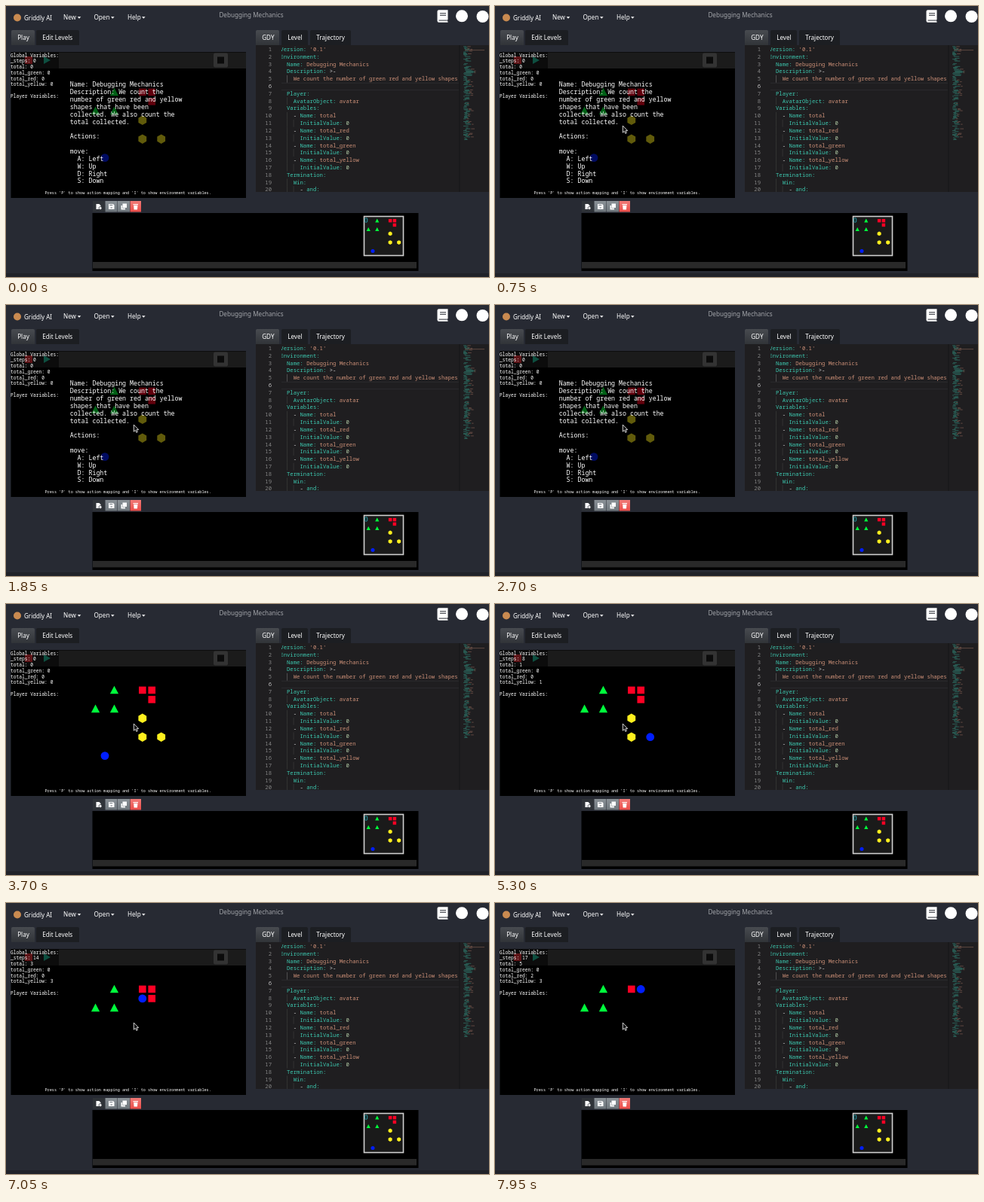
Recreate the animation shown at these times as an HTML page. Size 640 by 360 pixels, loop 8000 ms.

```html
<!DOCTYPE html>
<html lang="en">
<head>
<meta charset="utf-8">
<title>Debugging Mechanics</title>
<style>
html, body { margin: 0; width: 100%; height: 100%; overflow: hidden; background: #272a33; }
svg { display: block; width: 640px; height: 360px; }
text { white-space: pre; fill: #fff; }
.ui text { font: 8.15px "Noto Sans", sans-serif; }
.mono text { font-family: "Noto Sans Mono", monospace; }
.vars text { font-size: 6.27px; font-weight: 500; }
.help text { font-size: 8.28px; }
.code text { font-size: 7.27px; fill: #d4d4d4; }
.code .key { fill: #3dc9b0; }
.code .str { fill: #ce9178; }
.code .num { fill: #b5cea8; }
.code .line { fill: #858585; text-anchor: end; }
</style>
</head>
<body>
<svg viewBox="0 0 640 360">
  <defs>
    <polygon id="green" points="0,-5.8 5.6,4.8 -5.6,4.8" fill="#00ff3c"/>
    <rect id="red" x="-4.8" y="-4.8" width="9.6" height="9.6" fill="#ff0024"/>
    <polygon id="yellow" points="0,-6.2 5.4,-3.1 5.4,3.1 0,6.2 -5.4,3.1 -5.4,-3.1" fill="#fff01e"/>
    <circle id="blue" r="5.4" fill="#001eff"/>
    <linearGradient id="tabFill" x2="0" y2="1"><stop stop-color="#484b50"/><stop offset=".6" stop-color="#3a3d42"/><stop offset="1" stop-color="#313438"/></linearGradient>
    <linearGradient id="greyFill" x2="0" y2="1"><stop stop-color="#8a9196"/><stop offset=".6" stop-color="#7a8288"/><stop offset="1" stop-color="#70787d"/></linearGradient>
    <linearGradient id="redFill" x2="0" y2="1"><stop stop-color="#f17a77"/><stop offset=".6" stop-color="#ee5f5b"/><stop offset="1" stop-color="#ec4d49"/></linearGradient>
    <clipPath id="codeClip"><rect x="365" y="52" width="235" height="195"/></clipPath>
    <clipPath id="lineClip"><rect x="331" y="52" width="34" height="195"/></clipPath>
  </defs>
  <rect width="640" height="360" fill="#272a33"/>
  <rect y="355" width="640" height="5" fill="#202229"/>

  <g class="ui" id="ui">
    <circle cx="15" cy="15.500" r="5" fill="#c98a50"/>
    <text x="24" y="18.600" style="font-weight:500;font-size:8px">Griddly AI</text>
    <text x="325" y="14.800" text-anchor="middle" style="fill:#a3a5aa">Debugging Mechanics</text>
    <path d="M573.500 5.300h12v13h-1v2h1v1.500h-12q-2 0-2-2v-12.500q0-2 2-2z" fill="#fff"/>
    <path d="M575 9.800h8M575 12.300h8M573.500 19.100h10.500" stroke="#272a33"/>
    <circle cx="604" cy="13.300" r="8" fill="#fff"/>
    <circle cx="631.500" cy="14" r="8" fill="#fff"/>
  </g>

  <rect x="6.500" y="61" width="311.500" height="194" fill="#000"/>
  <rect x="70" y="61.500" width="248" height="21.500" fill="#1b1b1b"/>
  <rect x="6.500" y="61.500" width="63.500" height="21.500" fill="#0c0c0c"/>
  <rect x="25" y="67" width="10" height="10" fill="#5e1518"/>
  <path d="M50 67l9 5-9 5z" fill="#0e4f40"/>
  <rect x="275" y="62.500" width="19" height="19" rx="2" fill="#333"/>
  <rect x="280" y="67.500" width="9" height="9" fill="#0b0b0b"/>
  <g id="board"></g>
  <g class="mono vars" id="vars"></g>
  <g class="mono help" id="help"></g>
  <g class="mono"><text x="51.500" y="249.600" style="font-size:5.18px;font-weight:500">Press 'P' to show action mapping and 'I' to show environment variables.</text></g>

  <rect x="331" y="52" width="309" height="195" fill="#1f1e20"/>
  <path d="M365 102.300H600M365 111.700H600" stroke="#2b2b2e"/>
  <g class="mono code" id="lines" clip-path="url(#lineClip)"></g>
  <g class="mono code" id="code" clip-path="url(#codeClip)"></g>
  <path d="M600.800 52V247" stroke="#171719"/>
  <g id="minimap"></g>

  <g id="tools">
    <rect x="115" y="259" width="16" height="14.500" fill="#2f3338"/>
    <rect x="131.500" y="259" width="16" height="14.500" fill="url(#greyFill)"/>
    <rect x="148" y="259" width="16" height="14.500" fill="url(#greyFill)"/>
    <rect x="164.500" y="259" width="14.500" height="14.500" fill="url(#redFill)"/>
    <path d="M119.500 263h4l2 2v5h-6zM136 263h6l1.500 1.500v5.500h-7.500zM154.500 262.500h5.500v5.500h-5.500zM152.500 265h1.500v3.500h4v2h-5.500zM168.500 263h6.500v1.200h-6.500zM169.200 265h5.200l-.4 5.500h-4.400z" fill="#fff"/>
    <path d="M137.300 264.500h4M138.500 268h2.500" stroke="#6c757d"/>
    <circle cx="125" cy="268.500" r="2" fill="#fff" stroke="#2f3338" stroke-width=".7"/>
  </g>
  <rect x="114.500" y="275" width="432" height="77" fill="#000"/>
  <rect x="115" y="340" width="429" height="8.500" fill="#292929"/>
  <rect x="474.500" y="279.500" width="52" height="52" fill="#1a1a1a" stroke="#d0d0d0" stroke-width="1.600"/>
  <rect x="475.700" y="281.800" width="3" height="5.400" rx="1" fill="none" stroke="#23a8b4" stroke-width=".9"/>
  <g id="thumb" transform="translate(486 325.600) scale(.464)"></g>

  <path id="pointer" d="M0 0V9.200L2.100 7.300 3.500 10.400 5 9.700 3.700 6.700H6.500Z" fill="#111" stroke="#fff" stroke-width=".8"/>
</svg>
<script>
const NS = "http://www.w3.org/2000/svg", LOOP = 8000, CELL = 12.45;
const $ = id => document.getElementById(id);

function add(parent, tag, attrs, content) {
  const el = document.createElementNS(NS, tag);
  for (const k in attrs) el.setAttribute(k, attrs[k]);
  if (content !== undefined) el.textContent = content;
  return parent.appendChild(el);
}

// Menus and tabs
for (const [label, x, caret] of [["New", 76, 94.7], ["Open", 116.5, 139], ["Help", 161, 180]]) {
  add($("ui"), "text", { x, y: 18.4 }, label);
  add($("ui"), "path", { d: `M${caret} 14.200h4.600l-2.300 2.500z`, fill: "#fff" });
}
for (const [label, x, w, on] of [["Play", 7, 31, 1], ["Edit Levels", 40, 57, 0], ["GDY", 331, 31, 1],
                                 ["Level", 365, 35, 0], ["Trajectory", 403, 54, 0]]) {
  add($("ui"), "path", { d: `M${x} 52v-18q0-2 2-2h${w - 4}q2 0 2 2v18z`, fill: on ? "url(#tabFill)" : "#1c1e22" });
  add($("ui"), "text", { x: x + 8.2, y: 45 }, label);
}

// Game pieces, counted in cells from the start square
const pieces = [["green", 1, 7], ["green", -1, 5], ["green", 1, 5], ["red", 4, 7], ["red", 5, 7], ["red", 5, 6],
                ["yellow", 4, 4], ["yellow", 4, 2], ["yellow", 6, 2]];
const place = (i, j) => `translate(${i * CELL} ${-j * CELL})`;
const piece = (parent, kind, i, j) => add(parent, "use", { href: "#" + kind, transform: place(i, j) });

$("board").setAttribute("transform", "translate(131 201.600)");
const items = pieces.map(p => piece($("board"), ...p));
const avatar = piece($("board"), "blue", 0, 0);
pieces.forEach(p => piece($("thumb"), ...p));
piece($("thumb"), "blue", 0, 0);

// Keys pressed: R, L, U, or "." for a turn without a move
const keys = "RRRRRRUULLUUUUR.U";
const times = [3850, 4000, 4150, 4300, 4450, 4600, 5000, 5300, 5650, 5900, 6250, 6450, 6700, 6900, 7300, 7550, 7800];
const states = [{ i: 0, j: 0, got: [] }];
for (const k of keys) {
  const s = states[states.length - 1];
  const i = s.i + (k === "R") - (k === "L"), j = s.j + (k === "U");
  const hit = pieces.findIndex(p => p[1] === i && p[2] === j);
  states.push({ i, j, got: hit < 0 || s.got.includes(hit) ? s.got : [...s.got, hit] });
}

// Counters and help text
const rows = Array.from({ length: 8 }, (_, n) => add($("vars"), "text", { x: 6, y: 67.5 + n * 7.78 }));
rows[0].textContent = "Global Variables:";
rows[7].textContent = "Player Variables:";

`Name: Debugging Mechanics
Description: We count the
number of green red and yellow
shapes that have been
collected. We also count the
total collected.

Actions:

move:
  A: Left
  W: Up
  D: Right
  S: Down`.split("\n").forEach((s, n) => add($("help"), "text", { x: 84.7, y: 107.4 + n * 9.85 }, s));

// Editor
const CHAR = 4.362, ROW = 9.82;
const yaml = `Version: '0.1'
Environment:
  Name: Debugging Mechanics
  Description: >-
    We count the number of green red and yellow shapes

  Player:
    AvatarObject: avatar
  Variables:
${["total", "total_red", "total_green", "total_yellow"].map(v => `    - Name: ${v}\n      InitialValue: 0`).join("\n")}
  Termination:
    Win:
      - and:`;
yaml.split("\n").forEach((s, n) => {
  const y = 59.9 + n * ROW;
  const num = add($("lines"), "text", { x: 352, y, class: "line" }, n + 1);
  if (n === 5) num.style.fill = "#c6c6c6";
  const [, indent, dash, key = "", val] = s.match(/^(\s*)((?:- )?)(\w+:)?(.*)$/);
  for (let col = 2; col < indent.length; col += 2)
    add($("code"), "rect", { x: 363.3 + col * CHAR, y: y - 7.3, width: .6, height: ROW, fill: n === 4 ? "#707070" : "#404040" });
  const el = add($("code"), "text", { x: 363.3, y }, indent + dash);
  add(el, "tspan", { class: "key" }, key);
  const kind = /^ \d/.test(val) ? "num" : /^ >/.test(val) ? "op" : "str";
  add(el, "tspan", { class: kind }, val);
});

// Overview of the file: short seeded dashes
let seed = 11;
const rand = () => (seed = seed * 16807 % 2147483647) / 2147483647;
const dash = (x, y, width, fill) => add($("minimap"), "rect", { x, y, width, height: .8, fill, opacity: .45 });
for (let n = 0; n < 104; n++) {
  const y = 53.5 + n * 1.2, x = 606 + Math.floor(rand() * 4) * 1.1;
  const w = n > 25 && n < 33 ? 7 + rand() * 6 : 2 + rand() * 5;
  if (n === 4) dash(608, y, 26, "#ce9178");
  else if (rand() > .14) {
    dash(x, y, w, "#3dc9b0");
    if (rand() < .35) dash(x + w + 1, y, 2 + rand() * 3, "#ce9178");
  }
}

function draw(t) {
  const step = times.filter(at => at <= t).length;
  const { i, j, got } = states[step];
  const count = kind => got.filter(n => pieces[n][0] === kind).length;
  avatar.setAttribute("transform", place(i, j));
  items.forEach((el, n) => el.style.display = got.includes(n) ? "none" : "");
  [`_steps: ${step}`, `total: ${got.length}`, `total_green: ${count("green")}`,
   `total_red: ${count("red")}`, `total_yellow: ${count("yellow")}`].forEach((s, n) => rows[n + 1].textContent = s);

  const helpOn = t < 2800;
  $("help").style.display = helpOn ? "" : "none";
  $("board").style.opacity = helpOn ? .38 : 1;

  const p = Math.min(1, Math.max(0, (t - 150) / 500)), rest = (1 - p) ** 3;
  $("pointer").setAttribute("transform", `translate(${169.3 - 15 * rest} ${159 + 204 * rest})`);
}

const start = performance.now();
function tick() {
  draw((performance.now() - start) % LOOP);
  requestAnimationFrame(tick);
}
tick();
</script>
</body>
</html>
```
